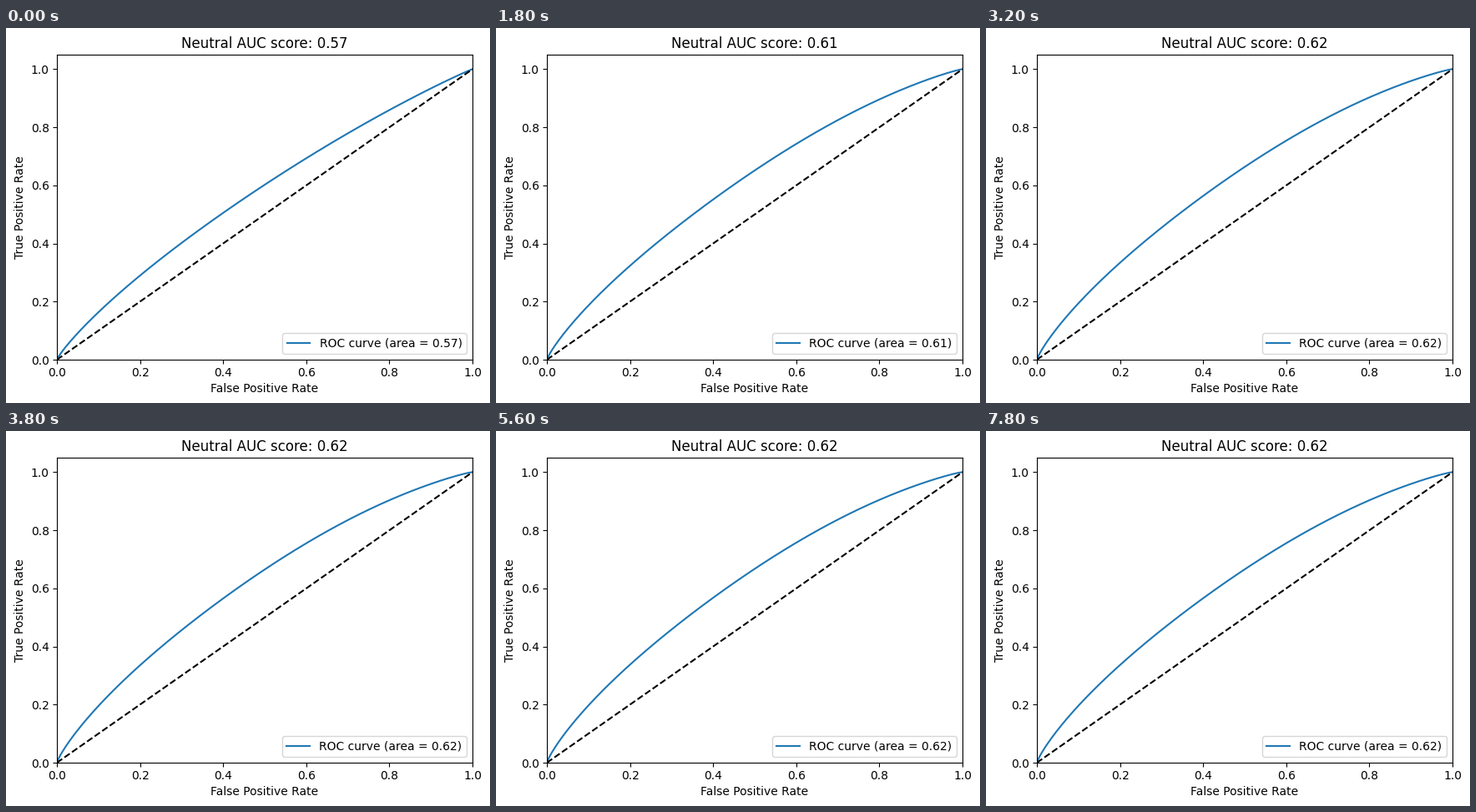
These frames come from a looping animation (580 px wide and 450 px high, 8 s). A matplotlib script:

```python
import numpy as np
import matplotlib.pyplot as plt
from matplotlib.animation import FuncAnimation

W, H, DPI = 580, 450, 100
FRAMES, INTERVAL = 40, 200
LEFT, RIGHT, TOP, BOTTOM = 61, 559, 32, 398

# Height of the curve above the diagonal, before and after training
KNOTS = np.array([0.1, 0.2, 0.4, 0.6, 0.8, 0.9])
START = np.array([0.064, 0.088, 0.107, 0.093, 0.059, 0.034])
END = np.array([0.097, 0.136, 0.168, 0.156, 0.104, 0.060])

fpr = np.linspace(0, 1, 401)


def envelope(x):
    return x ** 0.75 * (1 - x) ** 0.9


def bulge(heights):
    """Smooth curve through the knots that is zero at both ends."""
    coef = np.polyfit(KNOTS, heights / envelope(KNOTS), 3)
    return envelope(fpr) * np.polyval(coef, fpr)


first, last = bulge(START), bulge(END)


def roc(i):
    # The right side of the curve settles sooner than the left
    progress = 1 - np.exp(-(i / (8.1 - 2.6 * fpr)) ** 1.35)
    drift = 0.015 * progress * np.sin(i * 0.9 - 4.8)
    return fpr + first + (last - first) * (progress + drift)


def area(tpr):
    return np.sum((tpr[1:] + tpr[:-1]) / 2 * np.diff(fpr))


plt.rcParams["font.family"] = "DejaVu Sans"
fig = plt.figure(figsize=(W / DPI, H / DPI), dpi=DPI, facecolor="white")
ax = fig.add_axes([LEFT / W, 1 - BOTTOM / H, (RIGHT - LEFT) / W, (BOTTOM - TOP) / H])
curve, = ax.plot(fpr, roc(0), color="tab:blue", lw=1.5, label="ROC curve (area = 0.57)")
ax.plot([0, 1], [0, 1], "k--", lw=1.5)
ax.set_xlim(0, 1)
ax.set_ylim(0, 1.05)
ax.tick_params(axis="x", pad=2.8)
ax.tick_params(axis="y", pad=3.2)
ax.set_xlabel("False Positive Rate", labelpad=3.5)
ax.set_ylabel("True Positive Rate")
title = ax.set_title("", pad=5.5)
legend = ax.legend(loc="lower right")


def update(i):
    tpr = roc(i)
    auc = area(tpr)
    curve.set_ydata(tpr)
    title.set_text(f"Neutral AUC score: {auc:.2f}")
    legend.get_texts()[0].set_text(f"ROC curve (area = {auc:.2f})")
    return curve, title, legend


anim = FuncAnimation(fig, update, frames=FRAMES, interval=INTERVAL, repeat=True, repeat_delay=0)
plt.show()
```
